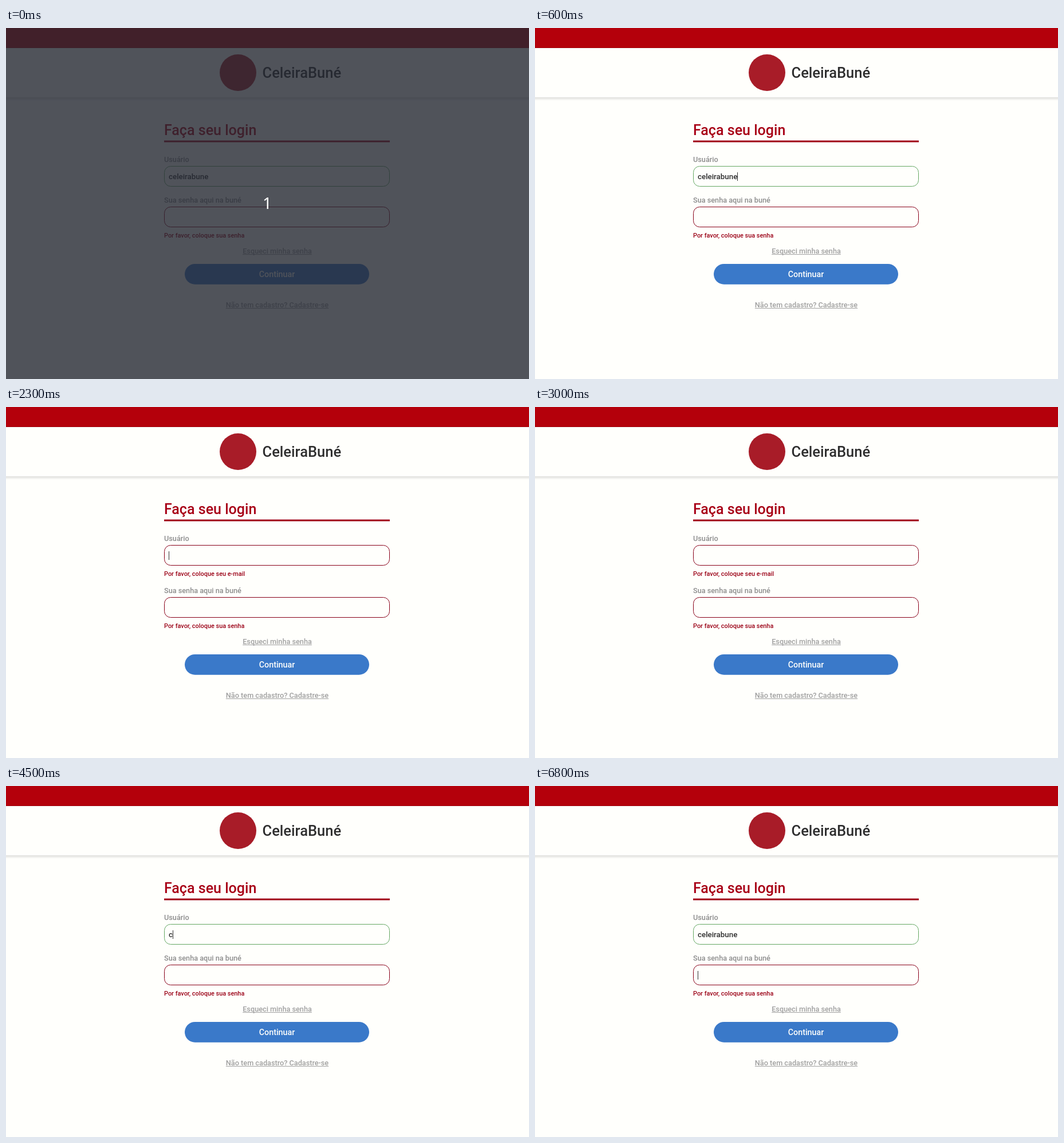
Recreate the animation shown at these times as an HTML page with a canvas. Size 913x613 px, loop 8 s.

```html
<!DOCTYPE html>
<html lang="pt-BR">
<head>
<meta charset="utf-8">
<title>Login</title>
<style>
  html, body { margin: 0; width: 100%; height: 100%; overflow: hidden; background: #fffffc; }
  canvas { display: block; }
</style>
</head>
<body>
<canvas id="stage" width="913" height="613"></canvas>
<script>
const ctx = document.getElementById('stage').getContext('2d');
const LOOP = 8000, PAPER = '#fffffc', RED = '#b4000b', WINE = '#9b0016';
const BAD = '#880018', GOOD = '#64a762';
const LABEL = '#8d8d8d', LINK = '#a0a0a0', INK = '#2e2e2e';
const USER = 'celeirabune', LEFT = 276, CENTER = 473, TEXT_X = 284;
const SMALL = 12.7, INPUT_SIZE = 13.333, ERROR_SIZE = 10.9, ERROR_SHIFT = 20;

// Each entry: start time, typed text, caret ('user', 'pass' or none), all selected
const timeline = [
  [0, USER], [500, USER, 'pass'], [600, USER, 'user'], [700, USER, '', true],
  [2300, '', 'user'], [3000, ''], [3300, '', 'pass'], [3900, '', 'user'],
  ...typing(4500, 1, 3), ...typing(5000, 4, 4),
  [5100, USER.slice(0, 4) + 't', 'user'],
  [5500, USER.slice(0, 4), 'user'],
  ...typing(5700, 5, 7), ...typing(6100, 8, 11),
  [6800, USER, 'pass']
];

function typing(start, from, to) {
  return Array.from({ length: to - from + 1 },
    (_, i) => [start + i * 100, USER.slice(0, from + i), 'user']);
}

function rect(x, y, w, h, color) {
  ctx.fillStyle = color;
  ctx.fillRect(x, y, w, h);
}

function text(str, x, y, size, color, align = 'left', font = '500 %px Roboto, sans-serif') {
  ctx.font = font.replace('%', size);
  ctx.fillStyle = color;
  ctx.textAlign = align;
  ctx.fillText(str, x, y);
}

function link(str, y) {
  text(str, CENTER + 0.5, y, SMALL, LINK, 'center');
  const w = ctx.measureText(str).width;
  rect(CENTER + 0.5 - w / 2, y + 1, w, 1, LINK);
}

function field(y, color) {
  ctx.strokeStyle = color;
  ctx.lineWidth = 1;
  ctx.beginPath();
  ctx.roundRect(LEFT + 0.5, y + 0.5, 393, 35, 11);
  ctx.stroke();
}

function caret(x, y) {
  rect(Math.round(x), y, 1, 15, '#333');
}

function header() {
  rect(0, 0, 913, 35, RED);
  rect(0, 34, 913, 1, '#a0000b');
  const shadow = ctx.createLinearGradient(0, 121, 0, 127);
  shadow.addColorStop(0, 'rgba(0,0,0,.13)');
  shadow.addColorStop(1, 'rgba(0,0,0,0)');
  rect(0, 121, 913, 6, shadow);
  ctx.fillStyle = '#a81c28';
  ctx.beginPath();
  ctx.arc(405, 78, 32, 0, Math.PI * 2);
  ctx.fill();
  text('CeleiraBuné', 447.5, 87, 25.5, INK);
}

function form([, typed, focus, selected]) {
  const shift = typed ? 0 : ERROR_SHIFT;
  text('Faça seu login', LEFT, 187, 25, '#a80016');
  rect(LEFT, 196.5, 394, 3, '#a00016');

  text('Usuário', LEFT, 234, SMALL, LABEL);
  field(241, typed ? GOOD : BAD);
  ctx.font = `500 ${INPUT_SIZE}px Roboto, sans-serif`;
  ctx.textAlign = 'left';
  const width = ctx.measureText(typed).width;
  if (selected) rect(TEXT_X, 252, width, 15, '#d2492a');
  text(typed, TEXT_X, 264, INPUT_SIZE, selected ? '#fff' : INK);
  if (focus === 'user') caret(TEXT_X + width, 252);
  if (!typed) text('Por favor, coloque seu e-mail', LEFT, 295, ERROR_SIZE, WINE);

  text('Sua senha aqui na buné', LEFT, 305 + shift, SMALL, LABEL);
  field(312 + shift, BAD);
  if (focus === 'pass') caret(TEXT_X, 323 + shift);
  text('Por favor, coloque sua senha', LEFT, 366 + shift, ERROR_SIZE, WINE);
  link('Esqueci minha senha', 394 + shift);

  ctx.fillStyle = '#3a79c9';
  ctx.beginPath();
  ctx.roundRect(312, 412 + shift, 322, 35.7, 17.8);
  ctx.fill();
  text('Continuar', CENTER, 435 + shift, 14.3, PAPER, 'center');
  link('Não tem cadastro? Cadastre-se', 488 + shift);
}

function draw(now) {
  const t = now % LOOP;
  rect(0, 0, 913, 613, PAPER);
  header();
  form(timeline.findLast(([start]) => start <= t));
  if (t < 300) {
    rect(0, 0, 913, 613, 'rgba(37,41,50,.8)');
    text('1', 456, 316, 28, '#fff', 'center', '400 %px "Noto Sans", sans-serif');
  }
}

const begin = performance.now();
function tick() {
  draw(performance.now() - begin);
  requestAnimationFrame(tick);
}
tick();
</script>
</body>
</html>
```
